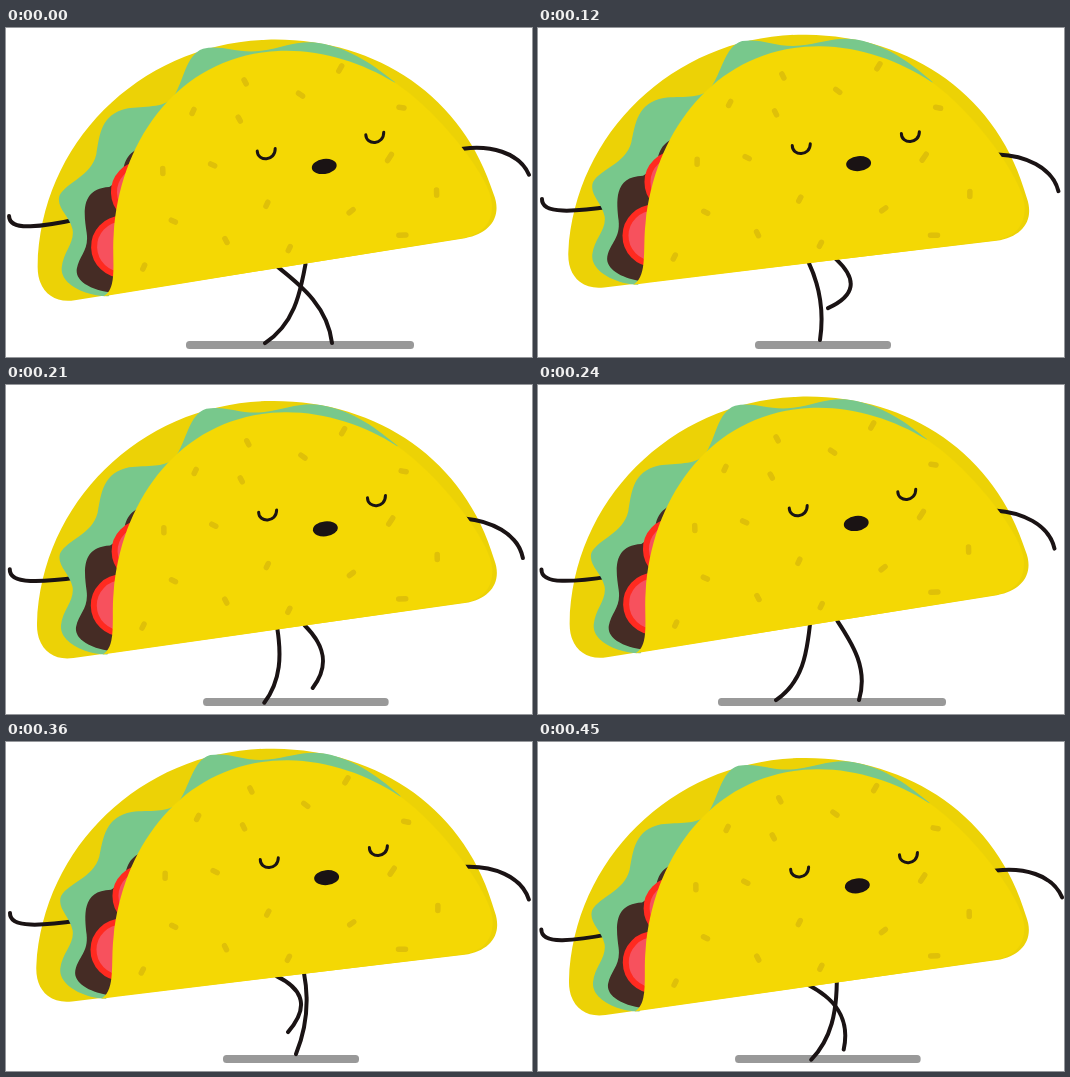
Recreate the animation shown at these times as an HTML page. Size 526x329 px, loop 0.48 s.

```html
<!DOCTYPE html>
<html lang="en">
<head>
<meta charset="utf-8">
<title>Walking taco</title>
<style>
  html, body { margin: 0; width: 100%; height: 100%; overflow: hidden; background: #fff; }
  svg { display: block; width: 526px; height: 329px; }
  .line { fill: none; stroke: #1a1314; stroke-width: 4; stroke-linecap: round; }
  .eye { stroke-width: 3; }
  .sprinkles { stroke: #dfc009; stroke-width: 5.5; stroke-linecap: round; }
</style>
</head>
<body>
<svg viewBox="0 0 526 329">
  <rect id="shadow" y="313" height="8" rx="3.5" fill="#999"/>
  <path id="legL" class="line"/>
  <path id="legR" class="line"/>
  <g id="taco">
    <path fill="#ecd206" d="M30 226C36 102 140 6.500 266 6.500C372 6.500 460 67 488 168C496 190 484 207 458 211L66 261C44 264 29 250 30 226Z"/>
    <path id="armL" class="line" d="M3 174.500C3 183 12 185.500 24 185.500S50 184 72 180"/>
    <path id="armR" class="line" d="M435 124L459 123C485 122 514 131 522 155"/>
    <path fill="#78c88c" d="M100 258C80 258 52 246 54 228C56 212 68 204 66 190C63 176 50 168 54 156C62 142 86 138 92 116C96 96 98 76 124 71C142 69 160 72 170 62C182 46 184 19 202 13.500C222 10 236 20 260 17.500C282 15 295 8 316 11C350 17 374 37 393 53L300 120L105 250Z"/>
    <path fill="#452c25" d="M100 254C84 251 67 243 69 230C72 216 82 212 80 194C78 176 74 150 104 149L118 140C118 122 126 114 138 110H180L110 250Z"/>
    <g fill="#f7515d" stroke="#ff2a20" stroke-width="6">
      <circle cx="136.500" cy="155" r="28"/>
      <circle cx="115" cy="209" r="28"/>
    </g>
    <path fill="#f4d804" d="M95 258C110 250 104 222 107 196C116 100 180 18 280 18C320 18 360 32 392 53C434 82 487 152 486 178C486 195 478 206 458 210.500Z"/>
    <path class="sprinkles" d="M242 46l2 4M296 61l4 3M337 40l3-5M396 78l5 1M189 78l2-4M235 83l2 4M158 132v5M206 129l4 2M383 131l4-6M431 162v5M260 173l2-4M343 182l4-3M165 184l4 2M218 204l2 4M281 218l2-4M392 206h7M135 232l2-4"/>
    <path class="line eye" d="M253 117.500C253 128.500 271 128.500 271 115.500"/>
    <path class="line eye" d="M362 104.500C362 115.500 380 115.500 380 102.500"/>
    <ellipse cx="319.500" cy="135" rx="12.500" ry="7.500" transform="rotate(-6 319.500 135)" fill="#1a1314"/>
  </g>
</svg>
<script>
const LOOP = 480, STRIDE = 240, STEP = 30;
const set = (id, attrs) => {
  for (const name in attrs) document.getElementById(id).setAttribute(name, attrs[name]);
};
const lerp = (a, b, k) => a + (b - a) * k;
const wave = t => Math.cos(2 * Math.PI * t / LOOP);

const legs = {
  legL: { hip: 270.5, hipY: 234, middle: 282, reach: 44, lift: 22, swingFirst: false },
  legR: { hip: 298, hipY: 231, middle: 290, reach: 31, lift: 32, swingFirst: true }
};

// A bowed line from hip to foot; the knee bends while the foot swings forward.
function legPath(leg, swinging, side, spread, drop) {
  const raised = 1 - spread;
  const x0 = leg.hip + 1.5 * spread, y0 = leg.hipY + drop;
  const x1 = leg.middle + leg.reach * side * spread * (swinging ? -1 : 1);
  const y1 = 312 + 0.6 * drop - (swinging ? leg.lift * raised : 0);
  const dx = x1 - x0, dy = y1 - y0, length = Math.hypot(dx, dy);
  const bow = 13 + (swinging ? 12 : -5) * raised;
  const handle = (k, b) => `${x0 + dx * k + dy / length * b} ${y0 + dy * k - dx / length * b}`;
  return `M${x0} ${y0}C${handle(1 / 3, bow - 4 * spread)} ${handle(2 / 3, bow + 4 * spread)} ${x1} ${y1}`;
}

function draw(now) {
  const t = Math.floor(now % LOOP / STEP) * STEP;
  const phase = t % STRIDE;
  const u = 1 - phase / 120;
  const spread = Math.abs(u) ** 2.15;
  const gap = Math.abs(phase - 210);
  const drop = 10 * (1 - Math.min(gap, STRIDE - gap) / 120) ** 2 - 0.5;

  const left = lerp(217, 180, spread), right = lerp(353, 408, spread);
  set('shadow', { x: left, width: right - left });
  set('taco', { transform: `translate(.6 ${drop}) rotate(${0.5 - 2.25 * spread} 265 195)` });
  set('armL', { transform: `rotate(${1.3 - 1.7 * wave(t)} 65 182)` });
  set('armR', { transform: `rotate(${2 - 5.9 * wave(t + 25)} 435 122)` });
  for (const id in legs) {
    const swinging = legs[id].swingFirst === t < STRIDE;
    set(id, { d: legPath(legs[id], swinging, Math.sign(u), spread, drop) });
  }
}

function tick() {
  draw(performance.now());
  requestAnimationFrame(tick);
}
tick();
</script>
</body>
</html>
```
